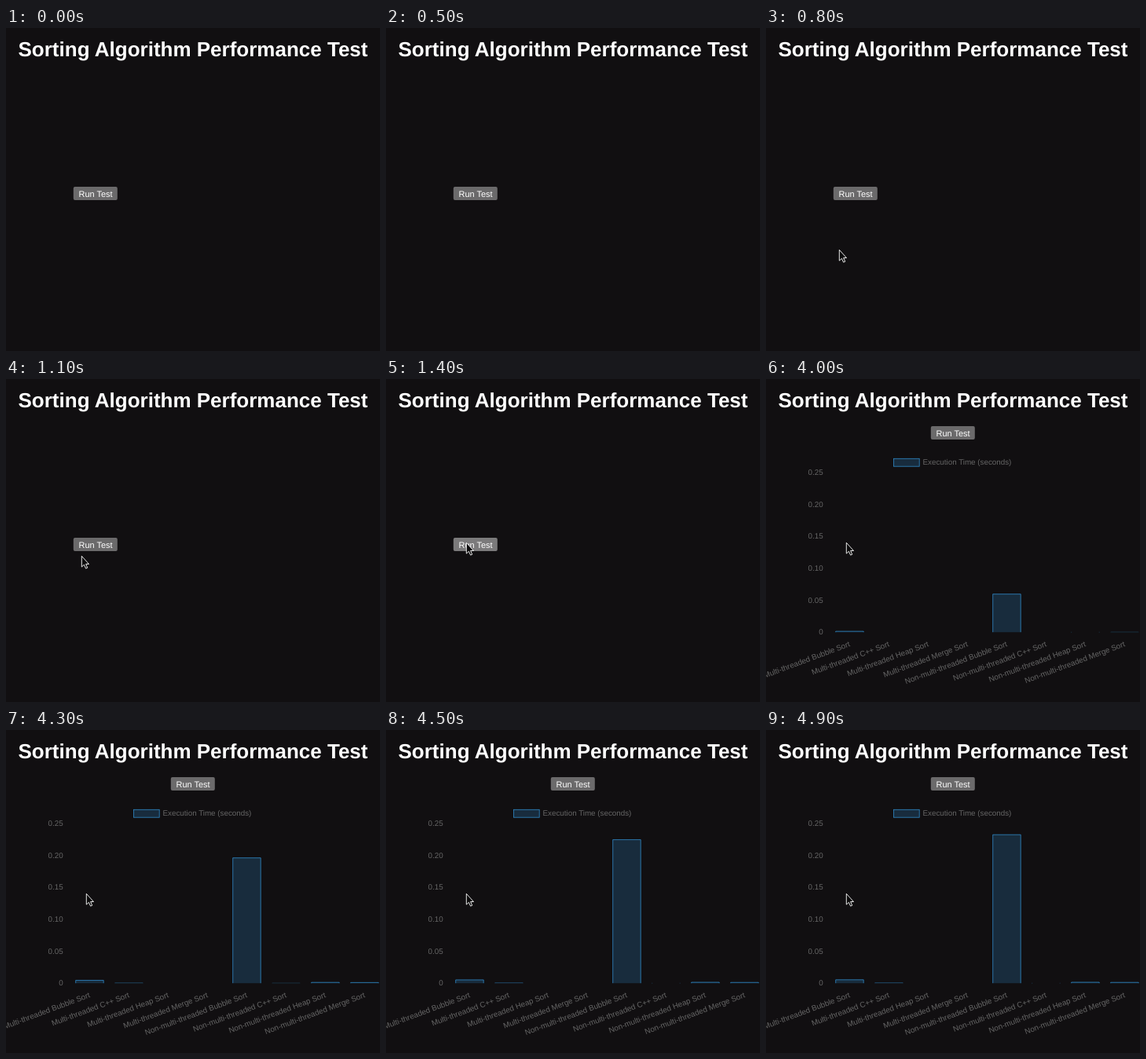
An HTML page with a canvas that plays this animation: 476x411 px, repeating every 5 s.

```html
<!DOCTYPE html>
<html lang="en">
<head>
<meta charset="utf-8">
<title>Sorting Algorithm Performance Test</title>
<style>
  html, body { margin: 0; width: 100%; height: 100%; overflow: hidden; background: #110f11; }
  canvas { display: block; }
</style>
</head>
<body>
<canvas id="stage" width="476" height="411"></canvas>
<script>
const ctx = document.getElementById('stage').getContext('2d');
const LOOP = 5000, STEP = 100;
const CURSOR_START = 600, HOVER_START = 1200, CHART_START = 4000;
const BASE = 322.2, BAR_WIDTH = 35.5, BAR_GAP = 50;
const BLUE = 'rgb(54,162,235)', PALE_BLUE = 'rgba(54,162,235,.2)', GREY = '#666';
const FONT = '"Liberation Sans", Arial, sans-serif';
const CHART_FONT_SIZE = 9.82, LINE_ALPHA = 0.8;

const kinds = ['Bubble', 'C++', 'Heap', 'Merge'];
const labels = ['Multi', 'Non-multi'].flatMap(p => kinds.map(k => `${p}-threaded ${k} Sort`));
const barHeights = [4.4, 0.5, 0, 0, 189, 0.3, 1.2, 1];
const cursorPath = [[91, 317], [92, 300], [93, 282], [94, 263], [95, 244], [96, 225], [99, 211], [102, 208]];
const arrow = new Path2D('M.3 .3V14.1L3.4 11.3L5.6 16.1L7.7 15.2L5.6 10.5H9.5Z');

// Unhinted glyphs, so that fractional sizes keep their true shape
ctx.textRendering = 'geometricPrecision';

function text(str, x, y, size, color, align = 'center', weight = '') {
  ctx.font = `${weight} ${size}px ${FONT}`;
  ctx.fillStyle = color;
  ctx.textAlign = align;
  ctx.fillText(str, x, y);
}

function button(x, y, hover) {
  ctx.fillStyle = hover ? '#7b7a7b' : '#6b6a6b';
  ctx.beginPath();
  ctx.roundRect(x, y, 56, 17, 2);
  ctx.fill();
  text('Run Test', x + 28.2, y + 12.5, 10.95, '#fff');
}

function bar(x, h) {
  if (h < 0.2) return;
  const top = BASE - h, right = x + BAR_WIDTH;
  if (h > 0.5) {
    ctx.fillStyle = PALE_BLUE;
    ctx.fillRect(x, top, BAR_WIDTH, h);
  }
  ctx.globalAlpha = Math.min(LINE_ALPHA, h);
  ctx.beginPath();
  // Hairline bars show only their corners
  if (h > 0.27 && h < 0.4) {
    for (const corner of [x, right]) {
      ctx.moveTo(corner - 0.5, BASE);
      ctx.lineTo(corner + 0.5, BASE);
    }
  } else {
    ctx.moveTo(x, BASE);
    ctx.lineTo(x, top);
    ctx.lineTo(right, top);
    ctx.lineTo(right, BASE);
  }
  ctx.stroke();
  ctx.globalAlpha = 1;
}

function chart(elapsed) {
  const grow = 1 - (1 - Math.min(1, elapsed / 1000 + 0.0715)) ** 4;
  ctx.strokeStyle = BLUE;
  ctx.lineWidth = 0.82;

  ctx.fillStyle = PALE_BLUE;
  ctx.fillRect(162.5, 101.3, 32.7, 9.9);
  ctx.globalAlpha = LINE_ALPHA;
  ctx.strokeRect(162.5, 101.3, 32.7, 9.9);
  ctx.globalAlpha = 1;
  text('Execution Time (seconds)', 199.5, 109, CHART_FONT_SIZE, GREY, 'left');

  for (let i = 0; i <= 5; i++) {
    const tick = i ? (i * 0.05).toFixed(2) : '0';
    text(tick, 72.7, 325.3 - i * 40.7, CHART_FONT_SIZE, GREY, 'right');
  }
  labels.forEach((label, i) => {
    const x = 88.7 + i * BAR_GAP;
    bar(x, barHeights[i] * grow);
    ctx.save();
    ctx.translate(x + 17.7, 336.8);
    ctx.rotate(-20.5 * Math.PI / 180);
    text(label, 0, 3.3, CHART_FONT_SIZE, GREY, 'right');
    ctx.restore();
  });
}

function cursor(t) {
  const i = Math.min(cursorPath.length - 1, (t - CURSOR_START) / STEP);
  ctx.save();
  ctx.translate(...cursorPath[i]);
  ctx.fillStyle = '#0b0a0b';
  ctx.strokeStyle = '#fff';
  ctx.lineWidth = 0.9;
  ctx.lineJoin = 'round';
  ctx.fill(arrow);
  ctx.stroke(arrow);
  ctx.restore();
}

function draw(now) {
  const t = Math.floor(now % LOOP / STEP) * STEP;
  ctx.fillStyle = '#110f11';
  ctx.fillRect(0, 0, 476, 411);
  text('Sorting Algorithm Performance Test', 238, 35.5, 26, '#fff', 'center', 'bold');
  if (t < CHART_START) {
    button(85.8, 202, t >= HOVER_START);
  } else {
    button(209.8, 60, false);
    chart(t - CHART_START);
  }
  if (t >= CURSOR_START) cursor(t);
}

const start = performance.now();
function loop() {
  draw(performance.now() - start);
  requestAnimationFrame(loop);
}
loop();
</script>
</body>
</html>
```
